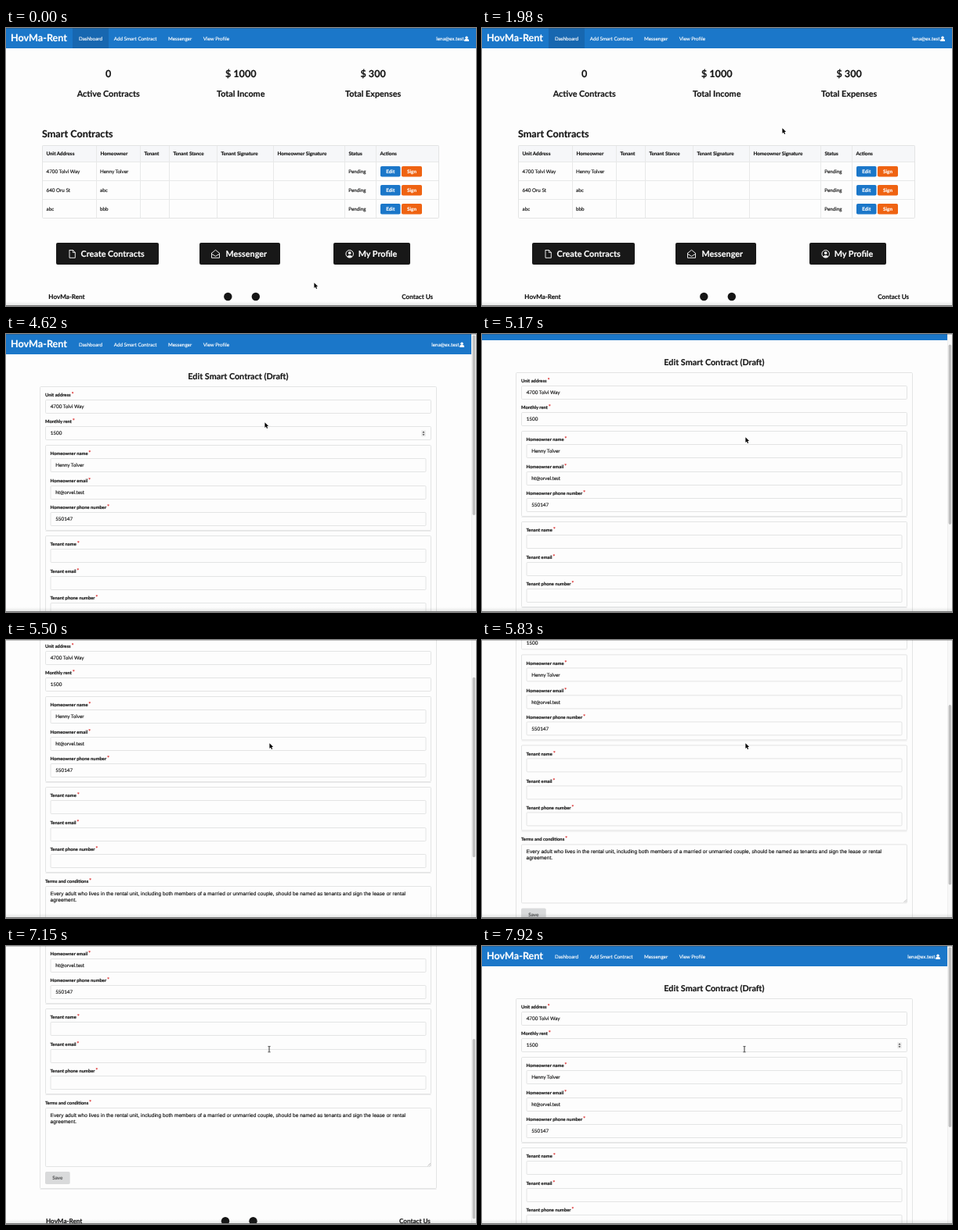
An HTML page with a canvas for the animation above (8 s loop, 600 px wide and 356 px high).

```html
<!DOCTYPE html>
<html lang="en">
<head>
<meta charset="utf-8">
<title>Rental dashboard</title>
<style>
html, body { margin: 0; width: 100%; height: 100%; overflow: hidden; background: #fdfdfd; }
canvas { display: block; width: 600px; height: 356px; }
</style>
</head>
<body>
<canvas id="stage"></canvas>
<script>
const W = 600, H = 356, LOOP = 8000, STEP = 110;
const ZOOM = 0.45; // the page is shown at 45 % of its CSS size
const PAGE_SWITCH = 3740, BEAM_FROM = 6270;
const INK = '#151515', BLUE = '#1b77c9', PAPER = '#fdfdfd', LINE = '#e3e4e4';
const BRAND = 'HovMa-Rent';

const canvas = document.getElementById('stage');
const ctx = canvas.getContext('2d');
const dpr = window.devicePixelRatio || 1;
canvas.width = W * dpr;
canvas.height = H * dpr;

// time, x, y
const POINTER = [
  [0, 394, 326], [220, 394, 326], [550, 391, 260], [880, 387, 170], [1320, 384, 128],
  [2310, 384, 128], [2640, 440, 160], [2970, 489, 181], [3850, 489, 181],
  [4180, 410, 140], [4510, 333, 114], [4620, 331, 113], [4840, 334, 122], [5060, 337, 132],
  [6160, 337, 132], [6270, 336, 132], [7700, 336, 132], [7810, 335, 132], [8000, 335, 132]
];
// time, offset
const SCROLL = [
  [0, 0], [4950, 0], [5170, 18], [5280, 34], [5500, 70], [5830, 123.6], [6050, 164], [6160, 178],
  [7150, 178], [7260, 160], [7480, 45], [7590, 10], [7700, 0], [8000, 0]
];

function track(keys, t) {
  let i = 1;
  while (i < keys.length - 1 && keys[i][0] <= t) i++;
  const a = keys[i - 1], b = keys[i];
  const k = Math.min(1, (t - a[0]) / (b[0] - a[0]));
  return a.slice(1).map((v, n) => v + (b[n + 1] - v) * k);
}

// A hairline outline gives the slightly heavy look of smoothed screen text.
function text(str, x, y, size = 14, { bold = false, color = INK, align = 'left', font = 'Lato', gap = 0 } = {}) {
  ctx.save();
  ctx.translate(x, y);
  ctx.scale(ZOOM, ZOOM);
  ctx.font = `${bold ? 700 : 400} ${size}px ${font}, sans-serif`;
  ctx.textRendering = 'geometricPrecision';
  ctx.letterSpacing = gap + 'px';
  ctx.textAlign = align;
  ctx.fillStyle = ctx.strokeStyle = color;
  ctx.lineWidth = 0.35;
  ctx.lineJoin = 'round';
  ctx.fillText(str, 0, 0);
  ctx.strokeText(str, 0, 0);
  const width = ctx.measureText(str).width * ZOOM;
  ctx.restore();
  return width;
}

function fill(x, y, w, h, color, r = 0) {
  ctx.fillStyle = color;
  ctx.beginPath();
  ctx.roundRect(x, y, w, h, r);
  ctx.fill();
}

function frame(x, y, w, h, color = LINE, r = 1.2) {
  ctx.strokeStyle = color;
  ctx.lineWidth = 1;
  ctx.beginPath();
  ctx.roundRect(x + 0.5, y + 0.5, w - 1, h - 1, r);
  ctx.stroke();
}

function line(points, color, width) {
  ctx.strokeStyle = color;
  ctx.lineWidth = width;
  ctx.beginPath();
  points.forEach(([x, y]) => ctx.lineTo(x, y));
  ctx.stroke();
}

function shape(points, color) {
  ctx.fillStyle = color;
  ctx.beginPath();
  points.forEach(([x, y]) => ctx.lineTo(x, y));
  ctx.closePath();
  ctx.fill();
}

function dot(x, y, r, color) {
  ctx.fillStyle = color;
  ctx.beginPath();
  ctx.arc(x, y, r, 0, Math.PI * 2);
  ctx.fill();
}

function person(x, y, color) {
  dot(x, y - 1.5, 1.7, color);
  fill(x - 3, y + 0.4, 6, 2.8, color, [1.8, 1.8, 0.5, 0.5]);
}

function nav(width, dashboard) {
  fill(0, 0, width, 26, BLUE);
  if (dashboard) fill(85, 0, 46, 26, '#1767b0');
  const white = { color: '#fff' };
  text(BRAND, 6, 17.4, 28, { bold: true, color: '#fff' });
  text('Dashboard', 93, 16, 14, white);
  text('Add Smart Contract', 137.7, 16, 14, white);
  text('Messenger', 207, 16, 14, white);
  text('View Profile', 251.7, 16, 14, white);
  text('lena@ex.test', width - 15.5, 16, 14, { color: '#fff', align: 'right' });
  person(width - 12, 13.7, '#fff');
}

function footer(x, y) {
  text(BRAND, x, y, 18, { bold: true });
  text('Contact Us', x + 451, y, 18, { bold: true });
  dot(x + 229, y - 2.8, 5.2, INK);
  dot(x + 264.5, y - 2.8, 5.2, INK);
}

function button(label, x, y, w, h, color, ink = '#fff') {
  fill(x, y, w, h, color, 1.8);
  text(label, x + w / 2, y + h / 2 + 2.2, 14, { bold: true, color: ink, align: 'center' });
}

function bigButton(label, x, w, textX) {
  fill(x, 275, w, 28, '#181818', 2);
  text(label, textX, 293.3, 24, { bold: true, color: '#fff' });
}

function fileIcon(x, y) {
  line([[x, y], [x + 4.6, y], [x + 7.3, y + 2.8], [x + 7.3, y + 9.8], [x, y + 9.8], [x, y - 0.4]], '#fff', 0.9);
  line([[x + 4.4, y], [x + 4.4, y + 3], [x + 7.3, y + 3]], '#fff', 0.8);
}

function mailIcon(x, y) {
  line([[x, y + 4], [x + 5, y], [x + 10, y + 4], [x + 10, y + 10], [x, y + 10], [x, y + 3.6]], '#fff', 0.9);
  line([[x, y + 5], [x + 5, y + 8], [x + 10, y + 5]], '#fff', 0.9);
}

function profileIcon(x, y) {
  ctx.save();
  ctx.beginPath();
  ctx.arc(x, y, 4.8, 0, Math.PI * 2);
  ctx.strokeStyle = '#fff';
  ctx.lineWidth = 1;
  ctx.stroke();
  ctx.clip();
  dot(x, y - 1.2, 1.9, '#fff');
  dot(x, y + 5, 3.4, '#fff');
  ctx.restore();
}

function dashboard() {
  nav(W, true);
  const mid = { bold: true, align: 'center' };
  [['0', 'Active Contracts', 130.7], ['$ 1000', 'Total Income', 299.7], ['$ 300', 'Total Expenses', 468.6]]
    .forEach(([value, label, x]) => {
      text(value, x, 62.7, 28, mid);
      text(label, x, 88.2, 24, mid);
    });
  text('Smart Contracts', 46, 140, 28, { bold: true });

  const cols = [46, 115, 171, 208, 269, 341, 432, 472];
  const heads = ['Unit Address', 'Homeowner', 'Tenant', 'Tenant Stance', 'Tenant Signature',
    'Homeowner Signature', 'Status', 'Actions'];
  const rows = [['4700 Tolvi Way', 'Henny Tolver'], ['640 Oru St', 'abc'], ['abc', 'bbb']];
  fill(46, 150, 507, 21, '#f6f7f9');
  cols.forEach((x, i) => {
    if (i) fill(x, 150, 1, 93, '#e8e9e9');
    text(heads[i], x + 5.4, 162.8, 14, { bold: true });
  });
  rows.forEach(([address, owner], i) => {
    const y = 171 + i * 24;
    fill(46, y, 507, 1, '#e8e9e9');
    text(address, 51.5, y + 14.8);
    text(owner, 120, y + 14.8);
    text('Pending', 437.3, y + 14.8);
    button('Edit', 478, y + 6, 25.5, 13.5, BLUE);
    button('Sign', 505, y + 6, 26, 13.5, '#ef6312');
  });
  frame(46, 150, 507, 94);

  bigButton('Create Contracts', 64, 131, 95.5);
  bigButton('Messenger', 247, 103, 280.5);
  bigButton('My Profile', 418, 98, 449.7);
  fileIcon(81, 284.5);
  mailIcon(262.5, 284.3);
  profileIcon(438.7, 289.3);
  footer(54.3, 346.8);
}

function label(str, x, y) {
  const w = text(str, x, y, 13, { bold: true });
  text('*', x + w + 1.1, y - 0.9, 14, { color: '#db2828', bold: true });
}

function field(name, value, x, y, w) {
  label(name, x, y + 0.2);
  frame(x, y + 4, w, 18);
  text(value, x + 6.7, y + 15.2);
}

function segment(x, y, w, h) {
  fill(x + 0.5, y + h, w - 1, 1, 'rgba(34,36,38,.08)');
  frame(x, y, w, h);
}

function group(who, y, values) {
  segment(50, y, 493, 110);
  ['name', 'email', 'phone number'].forEach((part, i) =>
    field(`${who} ${part}`, values[i] || '', 56.5, Math.round(y + 13 + i * 34.5), 480));
}

function spinner(x, y) {
  fill(x - 3, y - 4, 6, 8, '#ececec', 1);
  shape([[x - 1.5, y - 0.9], [x, y - 2.7], [x + 1.5, y - 0.9]], '#444');
  shape([[x - 1.5, y + 0.9], [x, y + 2.7], [x + 1.5, y + 0.9]], '#444');
}

function editor(scroll, pointerY) {
  ctx.save();
  ctx.translate(0, -scroll);
  nav(594, false);
  text('Edit Smart Contract (Draft)', 296.4, 57.5, 24, { bold: true, align: 'center' });
  segment(43, 67, 507, 422);
  field('Unit address', '4700 Tolvi Way', 50, 80, 493);
  field('Monthly rent', '1500', 50, 114, 493);
  if (scroll < 8 && pointerY < 136) spinner(533, 127.3);
  group('Homeowner', 142, ['Henny Tolver', 'ht@orvel.test', '550147']);
  group('Tenant', 258, []);

  label('Terms and conditions', 50, 380.8);
  frame(50, 385, 493, 76);
  const terms = { font: '"Liberation Sans", Arial', gap: 0.08 };
  text('Every adult who lives in the rental unit, including both members of a married or unmarried couple, ' +
    'should be named as tenants and sign the lease or rental', 56.6, 396.7, 14.6, terms);
  text('agreement.', 56.6, 405, 14.6, terms);
  line([[538.5, 459.5], [542, 456]], '#999', 0.6);
  line([[540.5, 459.5], [542, 458]], '#999', 0.6);
  button('Save', 50, 467, 31.7, 16, '#d9dadb', '#5c5d5e');
  footer(51, 533.1);
  ctx.restore();

  fill(594, 0, 6, H, '#f8f8f8');
  fill(594, 0, 0.5, H, '#e6e6e6');
  fill(595.6, 1.5 + scroll * 0.66, 3.6, 230.5, '#bfbfbf', 1.8);
}

function windowEdge() {
  const shade = ctx.createLinearGradient(0, 350, 0, H);
  shade.addColorStop(0, 'rgba(60,66,64,0)');
  shade.addColorStop(1, 'rgba(60,66,64,.14)');
  fill(0, 350, W, 6, shade);
  fill(0, 0, W, 1, 'rgba(60,60,60,.3)');
  fill(0, 355, W, 1, '#777');
}

function arrow(x, y) {
  const pts = [[0, 0], [0, 6.6], [1.5, 5.2], [2.6, 7.7], [3.7, 7.2], [2.7, 4.8], [4.7, 4.7]]
    .map(([px, py]) => [x + px - 0.6, y + py + 0.3]);
  line([...pts, pts[0], pts[1]], '#fff', 1);
  shape(pts, '#000');
}

function beam(x, y) {
  line([[x, y - 3.2], [x, y + 3.6]], '#222', 0.9);
  for (const dy of [-3.4, 3.8]) line([[x - 1.6, y + dy], [x + 1.6, y + dy]], '#333', 0.8);
}

function draw(t) {
  const [x, y] = track(POINTER, t);
  const [scroll] = track(SCROLL, t);
  ctx.setTransform(dpr, 0, 0, dpr, 0, 0);
  fill(0, 0, W, H, PAPER);
  if (t < PAGE_SWITCH) dashboard();
  else editor(scroll, y);
  windowEdge();
  if (t < BEAM_FROM) arrow(x, y);
  else beam(x, y);
}

const start = performance.now();
function tick(now) {
  const t = Math.max(0, now - start) % LOOP;
  draw(Math.floor(t / STEP) * STEP);
  requestAnimationFrame(tick);
}
draw(0);
requestAnimationFrame(tick);
</script>
</body>
</html>
```
